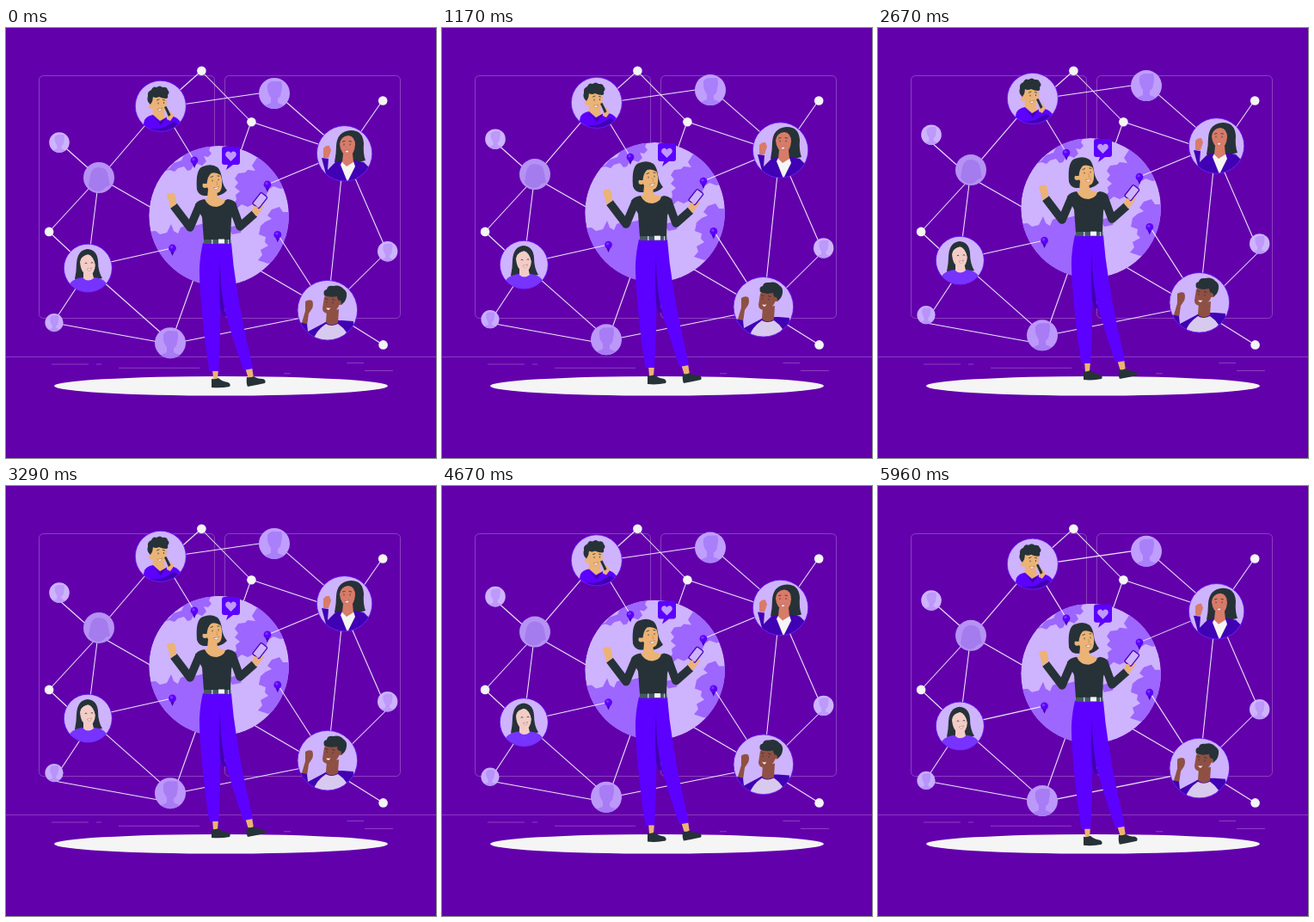
Recreate the animation shown at these times as an HTML page. Size 500 by 500 pixels, loop 6 s.

```html
<!DOCTYPE html>
<html lang="en">
<head>
<meta charset="utf-8">
<title>Connected people</title>
<style>
html, body { margin: 0; width: 100%; height: 100%; overflow: hidden; background: #6200ac; }
svg { display: block; width: 100%; height: 100%; }
.wire { stroke: #efe4fa; stroke-width: 1.05; fill: none; }
.faint { stroke: #a66bd0; stroke-width: .6; fill: none; }
.disc { fill: #ceb3ff; }
.rim { fill: none; stroke: #6d1fff; stroke-width: .8; }
.land { fill: #9d66ff; }
.ink { fill: #263238; }
.violet { fill: #5c00ff; }
.deep { fill: #4000b3; }
.tan { fill: #ebb376; }
.rose { fill: #d87b69; }
.pale { fill: #f3ccc6; }
.brown { fill: #8f5044; }
.white { fill: #f5f5f5; }
.mark { fill: none; stroke: #263238; stroke-width: .8; stroke-linecap: round; }
.smile { fill: #fff; stroke: #8c3a2e; stroke-width: .4; }
.arm { fill: none; stroke: #263238; stroke-width: 9.5; stroke-linejoin: round; }
</style>
</head>
<body>
<svg viewBox="0 0 500 500">
  <defs>
    <clipPath id="cGlobe"><circle cx="247.6" cy="218.3" r="81.4"/></clipPath>
    <clipPath id="cA"><circle cx="179.8" cy="90.8" r="29.6"/></clipPath>
    <clipPath id="cB"><circle cx="393.6" cy="145.9" r="32.2"/></clipPath>
    <clipPath id="cC"><circle cx="95.3" cy="279.2" r="28"/></clipPath>
    <clipPath id="cD"><circle cx="373.8" cy="328.2" r="34.8"/></clipPath>
    <g id="pin">
      <path class="deep" d="M-3 2L0 9 3 2z"/>
      <circle class="violet" r="4.4"/><circle cx="-1" cy="-1.2" r="1.7" fill="#7d33ff"/>
    </g>
  </defs>

  <g class="faint">
    <rect x="38.5" y="55.5" width="204" height="282" rx="5"/>
    <rect x="254.5" y="55.5" width="204" height="282" rx="5"/>
    <path d="M0 382.4H500M53 391H96M105 391h6M131 395.3h94M323 401.8h8M396.5 389.5H416M417 398.5h33"/>
  </g>
  <ellipse class="white" cx="250" cy="416.3" rx="194" ry="11.3"/>

  <path class="wire" id="still"/>
  <g class="drift"><path class="wire" id="links"/></g>
  <g class="white">
    <circle cx="227.4" cy="49.8" r="5.3"/><circle cx="285.4" cy="109.2" r="5.3"/>
    <circle cx="438.2" cy="84.5" r="5.3"/><circle cx="50.1" cy="236.9" r="5.3"/>
    <circle cx="438.6" cy="368.4" r="5.3"/>
  </g>

  <g class="drift">
    <g id="nodes"></g>

    <!-- globe -->
    <g clip-path="url(#cGlobe)">
      <circle class="disc" cx="247.6" cy="218.3" r="81.4"/>
      <g class="land">
        <path d="M183 167l7-4 5-6 9-3 4-8 8-5 10-3 12 0-2 4 3 4-4 4-5-1 3 6-5 5-5-2-5 2-3 5-4 1-4-5-7 2-4 4-6-2z"/>
        <path d="M293 149l-7 11 4 6-9-1-3 3-8 1-4 6 4 5-4 5 6 5-5 4 1 6-4 4 3 7 7-6 7 3 6-3 6 1 2-6 7-3 3-9 6-4 8 3 12-3-10-33z"/>
        <path d="M331 214l-9 0-4-6-9 3-5 7 5 4-7 3-6 5-2 10 8 3-1 6 4 4-9 5 2 6-5 6 12 4 16-6 9-26z"/>
        <path d="M163 237l11-1 5 4 8-2 5-10 3 8 5 3 3-7 8-3 8 1 16-4v72l-18 4-34-13z"/>
        <path d="M259 232l7-2 8 4-1 4-10 2z"/>
      </g>
    </g>
    <path class="wire" d="M95 278L193 256M180 90L219 154M393 145L304 182M374 330L316 240"/>
    <use href="#pin" x="219" y="154"/><use href="#pin" x="304" y="182"/>
    <use href="#pin" x="193.5" y="256"/><use href="#pin" x="315.8" y="240.3"/>
    <path class="violet" d="M254 138h15q3 0 3 3v15q0 3-3 3h-5l-8 6 2-6h-4q-3 0-3-3v-15q0-3 3-3z"/>
    <path fill="#bf99ff" d="M261.5 155l-5.500-5.500c-3-4 2.500-8.500 5.500-4 3-4.500 8.500 0 5.500 4z"/>

    <!-- caller, top left -->
    <g clip-path="url(#cA)">
      <circle class="disc" cx="179.8" cy="90.8" r="29.6"/>
      <path class="tan" d="M171 93l-1 12 9 5 6-4-2-13z"/>
      <path class="violet" d="M157 124l4-17q3-5 10-6l8 7 9-5q8-1 12 3l6 6v14z"/>
      <path class="deep" d="M160 115q8 4 23 1l12-7 10 5-9 11h-36zM170 102l9 7 8-5-7 9z"/>
      <path class="tan" d="M168 82q2-5 10-4 8 0 9 7-1 12-6 16-4 2-8-2-4-5-5-17z"/>
      <circle class="tan" cx="168.5" cy="91" r="2.800"/>
      <path class="ink" d="M168 89q-5-4-3-10-1-5 4-7 2-5 6-3 4-3 7 0 5-1 6 3 3 3 0 6 1 4-2 4-4 0-8-2-4 2-7 0 0 5-3 9z"/>
      <path class="tan" d="M187 106l0-9 3-1 4 4 0 4-3 4z"/>
      <path class="ink" d="M184 92l2.500-1 5 10-2.500 2z"/>
      <path class="mark" d="M177 87v1M183.500 86.500v1M175.500 84l2.500-1M182.500 83.500l2 .5"/>
      <path class="smile" d="M176.500 94q3 .8 5-1-1 4-3 3.500-1.500-.8-2-2.500z"/>
    </g>
    <circle class="rim" cx="179.8" cy="90.8" r="29.5"/>

    <!-- long hair, top right -->
    <g clip-path="url(#cB)">
      <circle class="disc" cx="393.6" cy="145.9" r="32.2"/>
      <path class="ink" d="M382 156q2-10 2-19 1-17 17-18 14 0 15 15-1 12 2 20l-12 3-14 0z"/>
      <path class="deep" d="M367 151l8 1-1 13 9-9 9-2h13l11 2 7 7-4 18h-44z"/>
      <path class="white" d="M391 155h13l2 6-9 18-8-20z"/>
      <path class="rose" d="M392 146l-1 10 5 5 8-5-1-10z"/>
      <path class="rose" d="M388 135q1-9 10-10 8 1 8 11-1 12-8 13-9-2-10-14z"/>
      <path class="ink" d="M387 138q1-15 12-15 8 2 8 16 2-18-8-18-14-1-12 17z"/>
      <path class="rose" d="M369 151l0-11q3-4 7-3l2 5-3 9z"/>
      <path class="mark" d="M393 135v1M400 135v1M391.500 132l2.500-.5M399 131.500l2.500.5"/>
      <path class="smile" d="M394 142.500q3 .8 5-1-1 4-3 3.500-1.500-.8-2-2.500z"/>
    </g>
    <circle class="rim" cx="393.6" cy="145.9" r="32.2"/>

    <!-- pale face, bottom left -->
    <g clip-path="url(#cC)">
      <circle class="disc" cx="95.3" cy="279.2" r="28"/>
      <path class="ink" d="M80 292q2-10 2-18 1-16 13-17 11 1 12 14 0 12 5 20l-14 3z"/>
      <path fill="#7733ff" d="M72 311l3-15q5-5 14-6h14q9 1 13 6l3 15z"/>
      <path class="pale" d="M90 284v7q5 5 12 0l-2-9z"/>
      <path class="pale" d="M86 272q1-8 10-9 8 2 8 12-1 12-8 13-9-2-10-16z"/>
      <path class="ink" d="M83 277q2-11 12-14 7 2 9 13 2-16-8-17-11-1-13 18z"/>
      <path class="mark" d="M92 273.500q1-1.200 2 0M99 273q1-1.200 2 0"/>
      <path class="smile" d="M94.500 280q3 .5 5-1.200-1 4-3 3.500-1.500-.5-2-2.300z"/>
    </g>
    <circle class="rim" cx="95.3" cy="279.2" r="28"/>

    <!-- raised fist, bottom right -->
    <g clip-path="url(#cD)">
      <circle class="disc" cx="373.8" cy="328.2" r="34.8"/>
      <path class="brown" d="M343 346l5-17 0-11q4-3 8-1 2 4 0 9l-4 6-2 14z"/>
      <path class="deep" d="M340 342l10 2 1 9 17-9 7-4h16l13 1v27h-60z"/>
      <path fill="#d8caee" d="M357 364q3-12 15-20 6 4 14 0 6 4 10 10l-12 14z"/>
      <path class="brown" d="M373 329l-1 13q5 6 14 1l1-16z"/>
      <path class="brown" d="M370 313q4-6 13-4 8 4 5 12-4 10-12 11-8 0-8-6z"/>
      <circle class="brown" cx="389" cy="319" r="3"/>
      <path class="ink" d="M370 311q-2-6 3-7 1-5 7-4 8-2 12 3 5 3 4 9-1 7-6 9 0-5-3-4-2-2-2-5-8 2-15-1z"/>
      <path class="mark" d="M373 318v1M380 319v1M371.500 315l2.500.2M379.500 315.500l2.500 1"/>
      <path class="smile" d="M372 325q3 1.200 5.500 0-1 3.500-3 3-2-1-2.500-3z"/>
    </g>
    <circle class="rim" cx="373.8" cy="328.2" r="34.8"/>

    <!-- standing woman -->
    <path class="tan" d="M240 396h7l-1 13h-5zM278 395l8-1 2 13-6 1z"/>
    <path class="ink" d="M239 408q4 1 8-1 4 4 11 5 4 2 2 5-10 2-21 1zM280 406q5 1 8-1 4 3 11 3 4 2 2 5-9 2-20 4-2-4-1-11z"/>
    <path class="violet" d="M229 250h33q2 26 6 50 4 28 10 55 5 22 9 41l-11 2q-9-27-17-53-7-24-9-45-1 35-1 54-1 25-2 45l-10.500 0q-5.500-32-8-63-4-40-3.500-58 1-16 4-28z"/>
    <path class="deep" d="M249 270q-2 22 0 55l3 10h4q-7-25-7-65z"/>
    <path class="arm" d="M225 206L214 232 195 207M263 206L272 231 289 216"/>
    <path class="ink" d="M231 199q-8 1-11 6l8 15 2 27h31l1-25 6-17q-2-5-10-6l-13 5z"/>
    <path fill="#455a64" d="M230 246h31.500v5H230z"/>
    <path class="white" d="M247 245.500h7v5h-7z"/>
    <path fill="#c6cbd0" d="M239 246h1.500v5H239zM258 246h1v5h-1z"/>
    <path class="ink" d="M222 188q-2-24 7-27 10-4 17 1 4 4 5 13 1 8 6 14-6 6-13 6l-14 0q-6-1-8-7z"/>
    <path class="tan" d="M235 187l-1 11-3 1q4 9 14 9 9-2 10-8l-9-3-1-10z"/>
    <path class="tan" d="M232 172q4-5 12-6 6 2 7 11 1 14-6 15-8 0-12-8z"/>
    <circle class="tan" cx="231.5" cy="183" r="3"/>
    <path class="ink" d="M229.500 181q-2-16 9-18 10 0 11 8-6-4-11-2-4 3-5 12z"/>
    <path class="mark" d="M240 177v1M247 176v1M238 173.500l2.500-1M246 172l2 .2"/>
    <path d="M244.500 178l1.500 4-1.500.5" fill="none" stroke="#c98646" stroke-width=".7"/>
    <path class="smile" d="M241.500 185.500q3.500.8 6-1.500-1 4-3.300 3.800-2 0-2.700-2.300z"/>
    <path class="tan" d="M191 209l-1-6-3-8q1-4 4-3 4-2 6 3l1 6 0 4z"/>
    <path class="tan" d="M286 213l3-7 5-2 5 4-3 5-5 6z"/>
    <rect x="-4.800" y="-8.300" width="9.600" height="16.600" rx="1.500" fill="#ceb3ff" stroke="#4600bd" stroke-width="1.300" transform="translate(295.300 200.500) rotate(38)"/>
    <path class="tan" d="M289 207l4 1-1 3-4 0zM297 208l2-3 1 4z"/>
  </g>
</svg>
<script>
const $ = id => document.getElementById(id);
const path = lines => lines.map(([a, b, c, d]) => `M${a} ${b}L${c} ${d}`).join('');

$('still').setAttribute('d', path([
  [50, 237, 108, 174], [50, 237, 95, 279], [62, 133, 108, 174], [108, 174, 170, 209.5],
  [95, 282, 56, 341], [56, 343, 191, 367.5], [191, 368, 221, 284], [227, 50, 180, 92],
  [227, 50, 285, 109], [285, 109, 393, 145], [285, 109, 272, 146], [393, 149, 438, 84],
  [393, 145, 443, 260], [443, 260, 374, 328], [374, 328, 438, 368], [374, 328, 284, 275.5]
]));
$('links').setAttribute('d', path([
  [108, 174, 95, 279], [108, 176, 180, 92], [95, 279, 191, 364], [191, 367.5, 374, 331],
  [180, 92.5, 312, 73.5], [312, 74, 393, 145], [393, 145, 374, 328]
]));

// x, y, radius, disc colour, silhouette colour
const nodes = [
  [312, 76, 18, '#c09eff', '#a980fa'],
  [108, 174, 18, '#b592f3', '#a57cee'],
  [191, 366.2, 18, '#bc98fa', '#a87cf4'],
  [62, 133.1, 11.8, '#ceb3ff', '#bd99fa'],
  [443.7, 259.8, 11.7, '#ceb3ff', '#bd99fa'],
  [56, 342.6, 10.6, '#c9adff', '#b793fa']
];
const longHair = 'M-12 9q1-6 2-12 2-9 10-9 10 0 11 11 1 6 2 10l-5 2q-4 5-9 5-7 0-11-7z';
const bust = 'M-8-10q3-5 9-4l7 0q2 6 0 12 0 6-4 8v5l7 3q-5 4-11 4-6 0-11-4l7-3v-6q-5-6-4-15z';
$('nodes').innerHTML = nodes.map(([x, y, r, disc, shade], i) => `
  <g transform="translate(${x} ${y}) scale(${r / 18})">
    <circle r="18" fill="${disc}"/>
    <path fill="${shade}" d="${i == 1 ? longHair : bust}"/>
  </g>`).join('');

const drifting = document.querySelectorAll('.drift');
function draw(now) {
  const phase = now % 6000 / 3000;
  const lift = -10 * (1 - Math.abs(1 - phase));
  drifting.forEach(g => g.setAttribute('transform', `translate(0 ${lift})`));
  requestAnimationFrame(draw);
}
draw(0);
</script>
</body>
</html>
```
